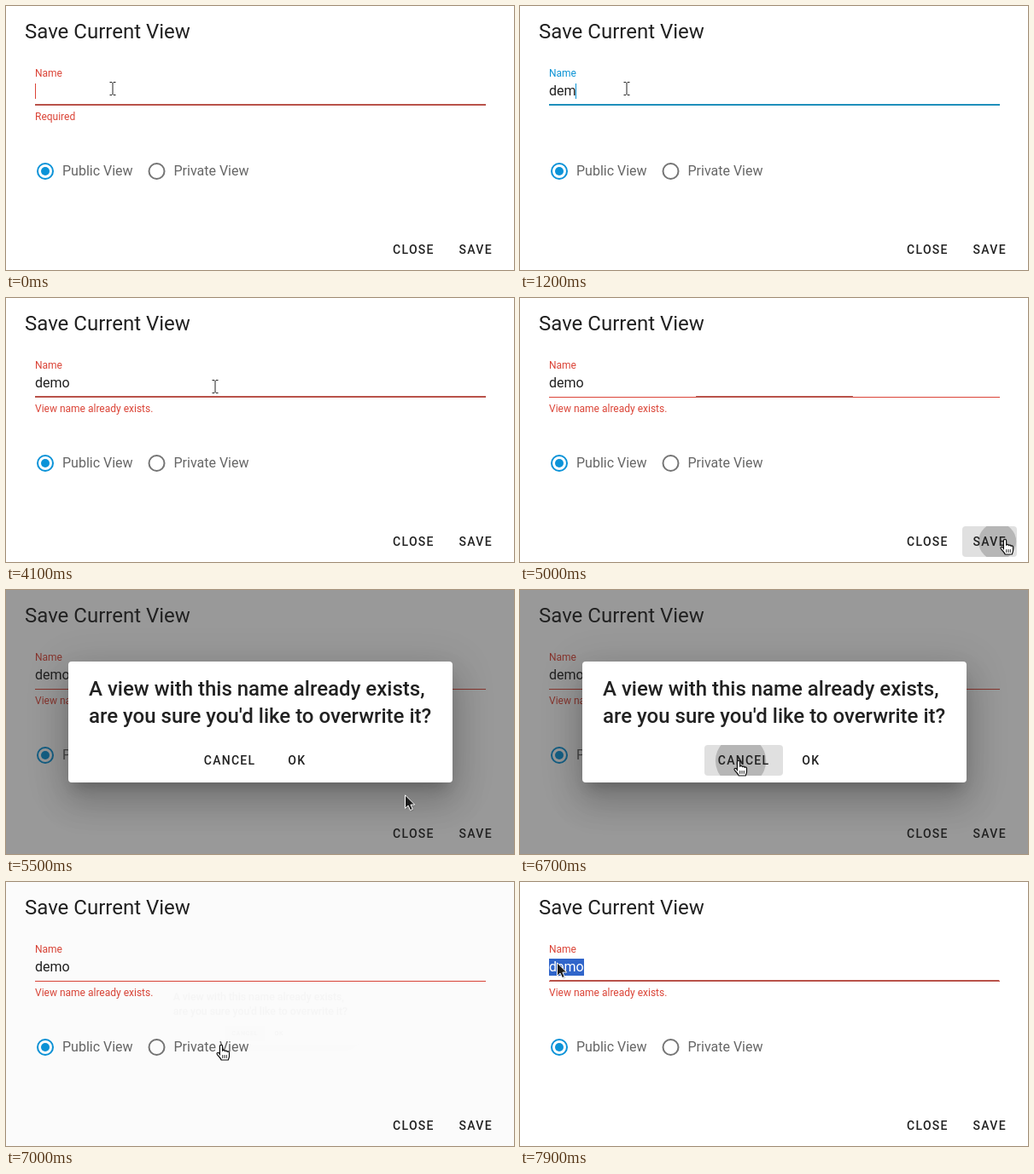
These frames come from a looping animation (595x310 px, 8 s). An HTML page:

```html
<!DOCTYPE html>
<html lang="en">
<head>
<meta charset="utf-8">
<title>Save view dialog</title>
<style>
  html, body { margin: 0; width: 100%; height: 100%; overflow: hidden; background: #fff; }
  #stage { position: relative; width: 595px; height: 310px; overflow: hidden; background: #fff; }
  svg { position: absolute; left: 0; top: 0; font-family: Roboto, sans-serif; }
  text { fill: #212121; white-space: pre; }
  .title { font-size: 24px; }
  .body { font-size: 16px; }
  .small { font-size: 12px; }
  .btn { font-size: 14px; font-weight: 500; letter-spacing: 1.25px; }
  .option { fill: #666; }
  .strong { font-weight: 500; }
  #overlay { position: absolute; inset: 0; background: #212121; }
  #dialog {
    position: absolute; left: 73px; top: 84px; width: 450px; height: 142px;
    border-radius: 4px; background: #fff;
    box-shadow: 0 11px 15px -7px rgba(0,0,0,.2), 0 24px 38px 3px rgba(0,0,0,.14),
                0 9px 46px 8px rgba(0,0,0,.12);
  }
</style>
</head>
<body>
<div id="stage">
  <svg width="595" height="310">
    <defs>
      <clipPath id="saveClip"><rect x="518" y="268" width="64" height="36" rx="4"/></clipPath>
    </defs>
    <text class="title" x="22" y="38">Save Current View</text>

    <text id="label" class="small" x="34" y="83">Name</text>
    <rect id="selection" x="34" y="90" width="41" height="20" fill="#3065ca"/>
    <text id="value" class="body" x="34" y="105"></text>
    <rect id="caret" y="91" width="1" height="18"/>
    <rect id="thin" x="34" y="116" width="528" height="1"/>
    <rect id="thick" y="115" height="2"/>
    <text id="hint" class="small" x="34" fill="#db4437" style="fill:#db4437"></text>

    <g fill="none" stroke-width="2">
      <circle cx="46" cy="194" r="9" stroke="#0b93d8"/>
      <circle cx="176.5" cy="194" r="9" stroke="#757575"/>
    </g>
    <circle cx="46" cy="194" r="5" fill="#0b93d8"/>
    <text class="body option" x="66" y="199">Public View</text>
    <text class="body option" x="196.5" y="199">Private View</text>

    <g clip-path="url(#saveClip)">
      <rect id="saveBg" x="518" y="268" width="64" height="36"/>
      <circle id="saveRipple"/>
    </g>
    <text class="btn" x="453.1" y="291">CLOSE</text>
    <text class="btn" x="530.6" y="291">SAVE</text>
  </svg>

  <div id="overlay"></div>
  <div id="dialog">
    <svg width="450" height="142">
      <defs>
        <clipPath id="cancelClip"><rect x="143" y="98" width="92" height="36" rx="4"/></clipPath>
      </defs>
      <text class="title strong" x="24" y="40">A view with this name already exists,</text>
      <text class="title strong" x="24" y="72">are you sure you'd like to overwrite it?</text>
      <g clip-path="url(#cancelClip)">
        <rect id="cancelBg" x="143" y="98" width="92" height="36"/>
        <circle id="cancelRipple"/>
      </g>
      <text class="btn" x="158.8" y="121">CANCEL</text>
      <text class="btn" x="257.3" y="121">OK</text>
    </svg>
  </div>

  <svg width="595" height="310">
    <g id="beam" fill="none">
      <path d="M-3.5-7.5H-1L0-6.5L1-7.5H3.5M0-6.5V6.5M-3.5 7.5H-1L0 6.5L1 7.5H3.5" stroke="#fff" stroke-width="2.6"/>
      <path d="M-3.5-7.5H-1L0-6.5L1-7.5H3.5M0-6.5V6.5M-3.5 7.5H-1L0 6.5L1 7.5H3.5" stroke="#222" stroke-width="1"/>
    </g>
    <g id="arrow" stroke-linejoin="round">
      <path d="M1.5 2V18L5.2 14.6L7.7 20L10.5 18.8L8.1 13.4H13Z" fill="#000" opacity=".15"/>
      <path d="M.5 .8V16.4L4.1 13.1L6.5 18.6L9.3 17.4L6.9 12.1H11.7Z" fill="#1c1c1c" stroke="#fff" stroke-width="1"/>
    </g>
    <g id="hand" stroke-linejoin="round" stroke-linecap="round">
      <path id="palm" d="M-1.6 11V1A1.6 1.6 0 0 1 1.6 1V6.2A1.5 1.5 0 0 1 4.4 6.7A1.5 1.5 0 0 1 7.1 7.4A1.4 1.4 0 0 1 9.5 8.6V12.4C9.5 14.4 8.6 15 8.3 17H.2C-.3 15-2.6 13.4-4.7 10.3C-5.8 8.5-3.6 7.4-1.6 9.8Z" fill="#fff" stroke="#111" stroke-width="1.2"/>
      <path d="M1.7 11.5V14.5M4 11.5V14.5M6.3 11.5V14.5" stroke="#111" stroke-width=".9"/>
    </g>
  </svg>
</div>

<script>
const LOOP = 8000, STEP = 100;
const $ = id => document.getElementById(id);
const set = (id, attrs) => { for (const k in attrs) $(id).setAttribute(k, attrs[k]); };
const clamp = v => Math.max(0, Math.min(1, v));
const mix = (a, b, p) => a + (b - a) * p;
const mixColor = (a, b, p) => `rgb(${a.map((v, i) => Math.round(mix(v, b[i], p)))})`;

// CSS-style cubic bezier, solved by bisection
function bezier(x1, y1, x2, y2) {
  const at = (a, b, s) => 3 * a * s * (1 - s) ** 2 + 3 * b * s * s * (1 - s) + s ** 3;
  return x => {
    if (x <= 0 || x >= 1) return clamp(x);
    let lo = 0, hi = 1;
    for (let i = 0; i < 24; i++) {
      const mid = (lo + hi) / 2;
      if (at(x1, x2, mid) < x) lo = mid; else hi = mid;
    }
    return at(y1, y2, lo);
  };
}
const swing = bezier(.25, .8, .5, 1);
const pop = bezier(.25, .8, .25, 1);
const decel = bezier(0, 0, .2, 1);
const ramp = (t, start, length = 300, ease = swing) => ease(clamp((t - start) / length));

const RED = [219, 68, 55], BLUE = [11, 147, 213];
const RED_LINE = [185, 82, 74], BLUE_LINE = [31, 143, 187];

// time, x, y, shape of the pointer
const pointer = [
  [0, 125, 97, 'beam'], [2400, 125, 97, 'beam'], [2600, 100, 114, 'beam'],
  [2700, 74, 132, 'arrow'], [2800, 50, 146, 'arrow'], [2900, 37, 147, 'arrow'],
  [3000, 38, 141, 'arrow'], [3100, 36, 108, 'beam'], [3200, 70, 104, 'beam'],
  [3400, 205, 99, 'beam'], [3500, 229, 98, 'beam'], [4000, 229, 98, 'beam'],
  [4100, 245, 104, 'beam'], [4200, 300, 140, 'arrow'], [4400, 440, 235, 'arrow'],
  [4600, 548, 282, 'arrow'], [4700, 567, 285, 'hand'], [4800, 567, 285, 'hand'],
  [4900, 569, 284, 'hand'], [5100, 567, 283, 'hand'], [5200, 556, 276, 'arrow'],
  [5400, 500, 256, 'arrow'], [5500, 467, 240, 'arrow'], [5700, 374, 209, 'arrow'],
  [6000, 260, 152, 'arrow'], [6200, 208, 163, 'arrow'], [6400, 230, 192, 'hand'],
  [6600, 256, 201, 'hand'], [6900, 256, 201, 'hand'], [7000, 252, 192, 'hand'],
  [7100, 225, 165, 'arrow'], [7300, 140, 106, 'beam'], [7400, 140, 106, 'beam'],
  [7700, 46, 99, 'beam'], [7800, 44, 98, 'beam'], [7900, 43, 94, 'arrow']
];

// time, typed text, caret x (0 hides it)
const typing = [
  [0, '', 34], [600, 'd', 43], [900, 'de', 51], [1200, 'dem', 65], [1700, 'dem', 0],
  [2100, 'demo', 75], [2600, 'demo', 0], [3100, 'demo', 75], [3900, 'demo', 0],
  [4400, 'demo', 75], [4900, 'demo', 0], [7700, 'demo', 43], [7800, 'demo', 0]
];

const current = (rows, t) => rows.findLastIndex(row => row[0] <= t);

function drawPointer(t) {
  const i = current(pointer, t);
  const [t0, x0, y0, kind] = pointer[i];
  const [t1, x1, y1] = pointer[i + 1] || [LOOP, x0, y0];
  const p = (t - t0) / (t1 - t0);
  for (const id of ['beam', 'arrow', 'hand'])
    set(id, { visibility: id === kind ? 'visible' : 'hidden' });
  set(kind, { transform: `translate(${Math.round(mix(x0, x1, p))} ${Math.round(mix(y0, y1, p))})` });
}

function drawField(t) {
  const [, text, caret] = typing[current(typing, t)];
  const valid = ramp(t, 600) - ramp(t, 2100);
  const color = mixColor(RED, BLUE, valid);
  const selected = t >= 7800;
  $('label').style.fill = color;
  $('value').textContent = text;
  $('value').style.fill = selected ? '#fff' : '#212121';
  set('selection', { visibility: selected ? 'visible' : 'hidden' });
  set('caret', { x: caret, fill: color, visibility: caret ? 'visible' : 'hidden' });

  const width = 528 * (1 - ramp(t, 4915) + ramp(t, 7630));
  set('thin', { fill: color });
  set('thick', { x: 298 - width / 2, width, fill: mixColor(RED_LINE, BLUE_LINE, valid) });

  const shown = 1 - valid;
  $('hint').textContent = t < 2100 ? 'Required' : 'View name already exists.';
  set('hint', { y: 134 - 4 * valid, opacity: shown });
}

function drawRipple(id, t, start, end, from, to, radius) {
  const grow = ramp(t, start, 250, decel);
  const opacity = .25 * (ramp(t, start, 100, decel) - ramp(t, end, 300, decel));
  set(id, {
    cx: mix(from[0], to[0], grow), cy: mix(from[1], to[1], grow),
    r: radius * mix(.3, 1, grow), opacity
  });
}

function drawButtons(t) {
  const focus = t < 4900 ? 0 : t < 5000 ? .08 : .12;
  set('saveBg', { opacity: focus * (1 - ramp(t, 5130, 200)) });
  drawRipple('saveRipple', t, 4960, 5110, [566, 286], [550, 286], 36.7);
  set('cancelBg', { opacity: t < 6400 ? 0 : t < 6700 ? .08 : .12 });
  drawRipple('cancelRipple', t, 6660, 6790, [183, 117], [189, 116], 49.4);
}

function drawDialog(t) {
  const open = ramp(t, 5130, 300, pop) - ramp(t, 6795, 300, pop);
  const dim = ramp(t, 5130) - ramp(t, 6785);
  $('overlay').style.opacity = .46 * dim;
  $('dialog').style.opacity = open;
  $('dialog').style.transform = open === 1 ? 'none' : `scale(${mix(.5, 1, open)})`;
}

function render(time) {
  const t = Math.floor((time % LOOP) / STEP) * STEP;
  drawField(t);
  drawButtons(t);
  drawDialog(t);
  drawPointer(t);
}

const start = performance.now();
function tick() {
  render(performance.now() - start);
  requestAnimationFrame(tick);
}
tick();
</script>
</body>
</html>
```
